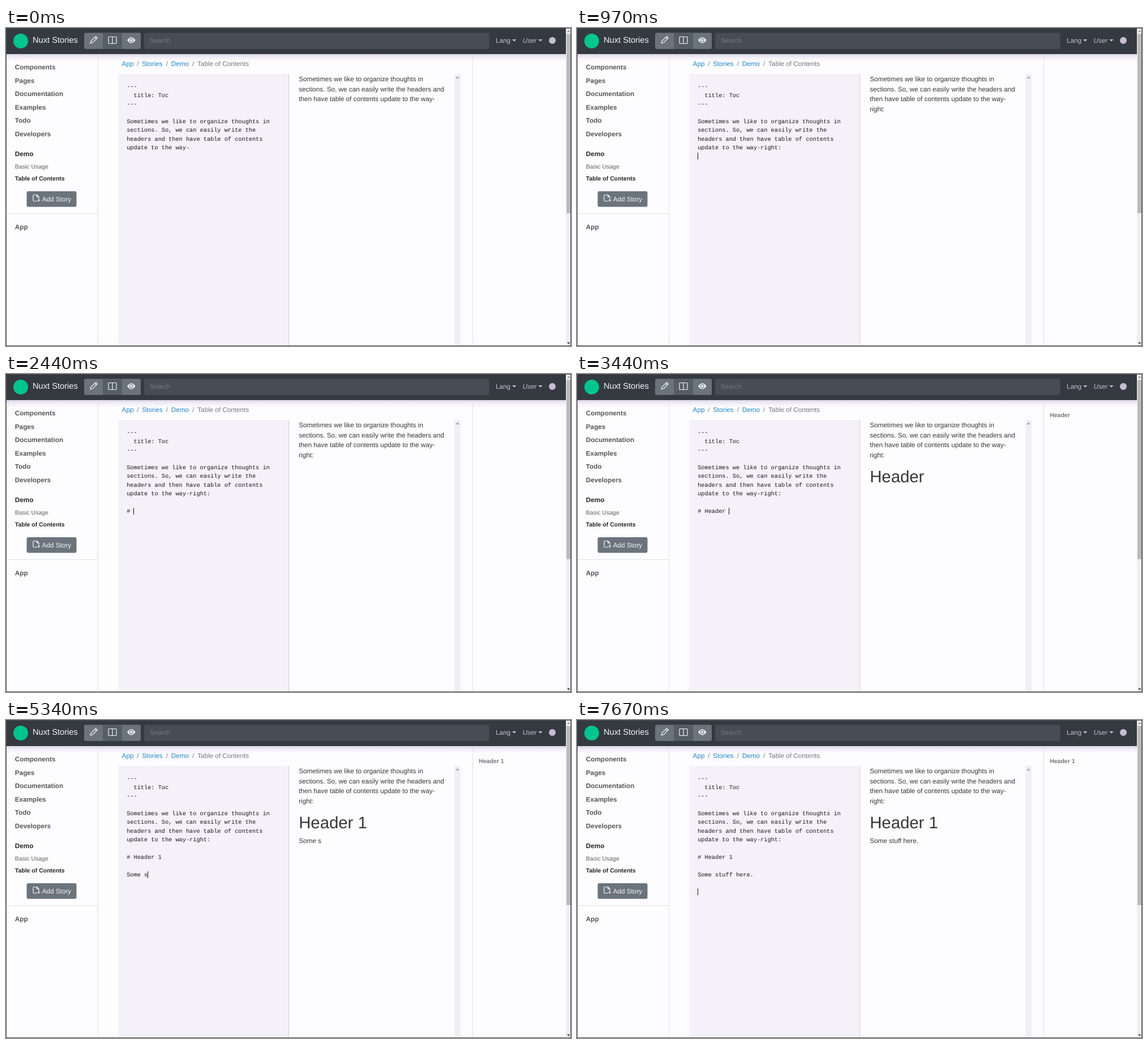
Recreate the animation shown at these times as an HTML page. Size 998 by 561 pixels, loop 8000 ms.

```html
<!DOCTYPE html>
<html lang="en">
<head>
<meta charset="utf-8">
<title>Live table of contents</title>
<style>
  html, body { margin: 0; width: 100%; height: 100%; overflow: hidden; background: #fdfcfe; }
  svg { display: block; width: 998px; height: 561px; }
  text { font: 11.73px "Liberation Sans", Arial, sans-serif; fill: #37373b; white-space: pre; text-rendering: geometricPrecision; }
  .mono { font: 10.27px "Liberation Mono", monospace; fill: #17171a; }
  .nav { font-weight: bold; fill: #56565a; }
  .small { font-size: 10.5px; fill: #606065; }
  .bold { font-weight: bold; fill: #26262a; }
  .toc { font-size: 10.5px; font-weight: bold; fill: #77777c; }
  .link { fill: #2387c9; }
  .muted { fill: #75797f; }
  .bar { fill: #c6bdd2; }
  .light { fill: #f6f5f8; }
  .icon { fill: none; stroke: #f6f5f8; stroke-width: 1.2; stroke-linejoin: round; }
</style>
</head>
<body>
<svg id="stage" viewBox="0 0 998 561">
  <defs>
    <linearGradient id="shade" x2="0" y2="1">
      <stop stop-color="#dcd8e8"/>
      <stop offset=".5" stop-color="#f3f0f8"/>
      <stop offset="1" stop-color="#fdfcfe"/>
    </linearGradient>
  </defs>
  <rect width="998" height="561" fill="#fdfcfe"/>
  <rect y="46" width="989" height="13" fill="url(#shade)"/>

  <!-- panels -->
  <path d="M162.5 46V560M824.5 46V560M1 327.5H162" stroke="#e1dfe5" fill="none"/>
  <rect x="198" y="81" width="301" height="479" fill="#f4f2f8"/>
  <path d="M499.5 81V560" stroke="#cfcbd3"/>
  <rect x="792" y="81" width="11" height="479" fill="#f0eff3"/>
  <path d="M794.5 89h6l-3-4z" fill="#a5a3aa"/>

  <!-- top bar -->
  <rect width="989" height="46" fill="#343a40"/>
  <circle cx="26" cy="23" r="13" fill="#00c58e"/>
  <rect x="138" y="8.500" width="100" height="28.500" rx="3" fill="#6b747c"/>
  <rect x="171" y="8.500" width="34" height="28.500" fill="#555d65"/>
  <g class="icon">
    <path d="M149 27l1.200-4 8.300-8.300 2.800 2.800-8.300 8.300zM156.700 16.500l2.800 2.800"/>
    <rect x="181" y="15.500" width="14" height="12" rx="1"/>
    <path d="M188 15.500v12"/>
  </g>
  <path class="light" d="M214 21.500q7.300-10 14.600 0q-7.300 10-14.600 0z"/>
  <circle cx="221.300" cy="21.500" r="2.900" fill="#f6f5f8" stroke="#6b747c" stroke-width="1.200"/>
  <rect x="244" y="8.500" width="609.500" height="28.500" rx="3" fill="#484d55"/>
  <path class="bar" d="M894 20h7.400l-3.700 3.800zM940.300 20h7.400l-3.700 3.800z"/>
  <circle class="bar" cx="965" cy="22" r="6"/>

  <!-- add button -->
  <rect x="36.500" y="288" width="88" height="27.500" rx="3" fill="#6b747c"/>
  <path class="icon" d="M55 305.500h-5.500q-1.500 0-1.500-1.500v-8q0-1.500 1.500-1.500h5l3.500 3.500v3.500M54.500 294.500v3.500h3.500M57.800 301.500v5M55.300 304h5"/>

  <!-- page scrollbar and window edge -->
  <rect x="989" width="9" height="561" fill="#efeef2"/>
  <rect x="990" y="10.500" width="7" height="316" fill="#bcbabf"/>
  <path d="M991 7h5.500l-2.700-3.500z" fill="#9b999f"/>
  <path d="M991 554.500h5.500l-2.700 3.500z" fill="#4a494d"/>
  <rect x=".5" y=".5" width="997" height="560" fill="none" stroke="#4b4a4e"/>

  <rect id="caret" width="1" height="12" fill="#111"/>
</svg>
<script>
const LOOP = 8000, CHAR = 6.163, LEFT = 213.2, ROW = 15.4, FIRST = 106.1;
const stage = document.getElementById('stage');
const caret = document.getElementById('caret');

function label(x, y, content = '', cls = '') {
  const node = document.createElementNS('http://www.w3.org/2000/svg', 'text');
  node.setAttribute('x', x);
  node.setAttribute('y', y);
  node.setAttribute('class', cls);
  node.textContent = content;
  stage.insertBefore(node, caret);
  return node;
}

label(47, 26.3, 'Nuxt Stories', 'light').style.fontSize = '14.67px';
label(253.7, 26.2, 'Search', 'muted');
label(865, 26.2, 'Lang', 'bar');
label(912.5, 26.2, 'User', 'bar').style.fontStyle = 'italic';

['Components', 'Pages', 'Documentation', 'Examples', 'Todo', 'Developers']
  .forEach((name, i) => label(15.8, 73.2 + i * 23.47, name, 'nav'));
label(15.8, 225.6, 'Demo', 'bold');
label(15.8, 247.6, 'Basic Usage', 'small');
label(15.8, 269, 'Table of Contents', 'small bold');
label(63.7, 305.6, 'Add Story', 'light');
label(15.8, 355.4, 'App', 'nav');

[[204.6, 'App'], [240.2, 'Stories'], [291.8, 'Demo']].forEach(([x, name]) => label(x, 67.3, name, 'link'));
[231.2, 282.8, 329].forEach(x => label(x, 67.3, '/', 'muted'));
label(338, 67.3, 'Table of Contents', 'muted');

['Sometimes we like to organize thoughts in', 'sections. So, we can easily write the headers and']
  .forEach((line, i) => label(517.2, 94 + i * 17.6, line));
const para = [3, 4].map(i => label(517.2, 94 + i * 17.6 - 17.6));
const heading = label(517.2, 191.3);
heading.style.fontSize = '29.33px';
const body = label(517.2, 217);
const toc = label(835.2, 76.2, '', 'toc');
const rows = Array.from({ length: 14 }, (_, i) => label(LEFT, FIRST + i * ROW, '', 'mono'));

const opening = `---
  title: Toc
---

Sometimes we like to organize thoughts in
sections. So, we can easily write the
headers and then have table of contents
update to the way-`;
const typed = 'right:\n\n# Header 1\n\nSome stuff here.\n\n';
const keys = [
  30, 180, 320, 440, 670, 730, 970, 1200,
  2200, 2440, 2600, 2720, 2840, 2960, 3070, 3180, 3300, 4000, 4340, 4640,
  4840, 4940, 5040, 5140, 5240, 5340, 5510, 5810, 5910, 6010, 6110, 6220, 6330, 6440, 6550,
  7210, 7440, 7670
];

function showPreview(text) {
  const [tail, , title = '', , content = ''] = text.split('\n');
  const wraps = tail.length > 3;
  para[0].textContent = 'then have table of contents update to the way-' + (wraps ? '' : tail);
  para[1].textContent = wraps ? tail : '';
  heading.textContent = toc.textContent = title.slice(2);
  body.textContent = content;
}

function render(t) {
  const count = keys.filter(k => k <= t + 4).length;
  const text = typed.slice(0, count);
  const lines = (opening + text).split('\n');
  rows.forEach((row, i) => row.textContent = lines[i] || '');
  showPreview(text);

  const last = lines.length - 1;
  const idle = t - (count ? keys[count - 1] : -600);
  caret.setAttribute('x', Math.round(LEFT + lines[last].length * CHAR - .5));
  caret.setAttribute('y', Math.round(FIRST + last * ROW - 9));
  caret.style.opacity = idle % 1000 < 500 ? 1 : 0;
}

function frame() {
  render(performance.now() % LOOP);
  requestAnimationFrame(frame);
}
frame();
</script>
</body>
</html>
```
